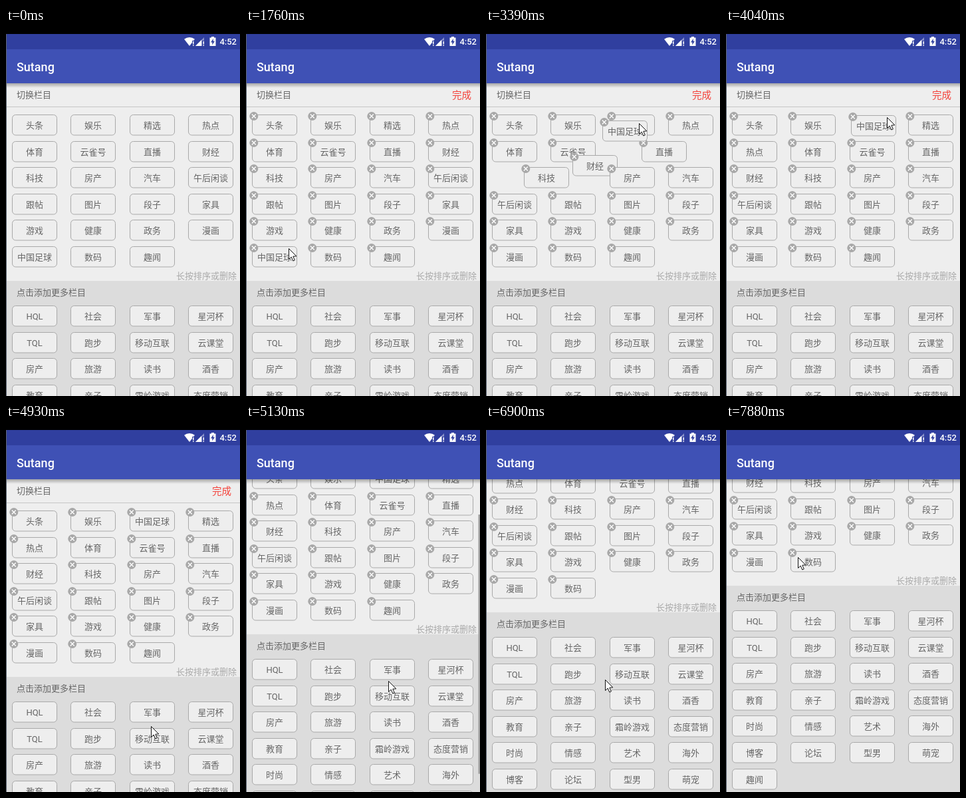
An HTML page with a canvas for the animation above (8 s loop, 352x553 px).

```html
<!DOCTYPE html>
<html lang="zh-CN">
<head>
<meta charset="utf-8">
<style>
  html, body { margin: 0; width: 100%; height: 100%; overflow: hidden; background: #eee; }
  canvas { display: block; }
</style>
</head>
<body>
<canvas id="stage" width="352" height="553"></canvas>
<script>
const ctx = document.getElementById('stage').getContext('2d');
const LOOP = 8000, TOP = 83, VIEW = 470;
const FONT = 'Roboto, "Noto Sans CJK SC", "Noto Sans CJK", sans-serif';

const mine = ('头条 娱乐 精选 热点 体育 云雀号 直播 财经 科技 房产 汽车 午后闲谈 跟帖 图片 段子 家具 ' +
  '游戏 健康 政务 漫画 中国足球 数码 趣闻').split(' ');
const more = ('HQL 社会 军事 星河杯 TQL 跑步 移动互联 云课堂 房产 旅游 读书 酒香 教育 亲子 霜岭游戏 态度营销 ' +
  '时尚 情感 艺术 海外 博客 论坛 型男 萌宠').split(' ');
const HELD = '中国足球', REMOVED = '趣闻';

// The screen refreshes in even beats inside each section: [start, beats]
const sections = [[0, 1], [330, 8], [1200, 1], [1760, 1], [2080, 8], [2970, 8], [3840, 8],
  [4690, 8], [5580, 8], [6460, 8], [7360, 6], [LOOP, 1]];

// Tracks: [time, values...]
const cursorPath = [[330, 189, 520], [600, 130, 440], [980, 52, 348], [1100, 52, 348], [1200, 64, 331],
  [2080, 64, 331], [2300, 72, 357], [2525, 116, 311], [2747, 158, 245], [2970, 166, 214],
  [3190, 179, 183], [3296, 213, 162], [3405, 230, 143], [3622, 242, 134], [4300, 242, 134],
  [4594, 222, 420], [4912, 218, 454], [5357, 211, 318], [5580, 211, 318], [6050, 167, 262],
  [6350, 187, 233], [6460, 187, 233], [6910, 179, 384], [7247, 172, 300], [7360, 172, 300], [7893, 108, 200]];
const dragPath = [[2080, 9, 328], [2300, 18, 354], [2525, 62, 308], [2747, 104, 244], [2970, 112, 212],
  [3190, 125, 180], [3296, 158, 158], [3405, 175, 139], [3622, 188, 131]];
const scrollPath = [[4912, 0], [5250, 97], [6910, 97], [7022, 101], [7247, 136.6]];
const barPath = [[4912, 0], [5023, 1], [5580, 1], [5900, 0], [6910, 0], [7022, 1], [7460, 1], [7800, 0]];
const swaps = [[2545, 17], [2870, 13], [3079, 9], [3273, 6], [3560, 2]];
const EDIT = 1760, GRAB = 2080, DROP = 4160, REMOVE = 6440;

const clamp = v => Math.max(0, Math.min(1, v));
const ease = v => 0.5 - Math.cos(Math.PI * clamp(v)) / 2;
const mix = (a, b, k) => a.map((v, i) => v + (b[i] - v) * k);
const slot = (i, top) => [9 + 88.33 * (i % 4), top + 39.6 * Math.floor(i / 4)];

function track(keys, t) {
  const n = keys.findIndex(k => k[0] > t);
  if (n === 0) return keys[0].slice(1);
  if (n < 0) return keys[keys.length - 1].slice(1);
  const a = keys[n - 1], b = keys[n];
  return mix(a, b, (t - a[0]) / (b[0] - a[0])).slice(1);
}

function snap(t) {
  const n = sections.findIndex(s => s[0] > t) - 1;
  const [start, beats] = sections[n];
  const beat = (sections[n + 1][0] - start) / beats;
  return start + beat * Math.min(beats - 1, Math.floor((t - start + 20) / beat));
}

function rect(x, y, w, h, color) {
  ctx.fillStyle = color;
  ctx.fillRect(x, y, w, h);
}

function poly(points, color) {
  ctx.beginPath();
  points.forEach(p => ctx.lineTo(...p));
  ctx.closePath();
  ctx.fillStyle = color;
  ctx.fill();
}

function text(s, x, y, color, size = 13, align = 'left', weight = 400) {
  ctx.font = `${weight} ${size}px ${FONT}`;
  ctx.textAlign = align;
  ctx.fillStyle = color;
  ctx.fillText(s, x, y);
}

function chip(label, [px, py], closable) {
  const x = Math.round(px), y = Math.round(py);
  ctx.beginPath();
  ctx.roundRect(x + 0.5, y + 0.5, 67, 30.5, 5);
  ctx.fillStyle = '#eee';
  ctx.fill();
  ctx.strokeStyle = '#a9a9a9';
  ctx.lineWidth = 1;
  ctx.stroke();
  text(label, x + 34, y + 21, '#666', 13, 'center');
  if (!closable) return;
  const cx = x + 2.8, cy = y + 2.5;
  ctx.beginPath();
  ctx.arc(cx, cy, 6.5, 0, 7);
  ctx.fillStyle = '#a8a8a8';
  ctx.fill();
  ctx.beginPath();
  for (const d of [-3, 3]) {
    ctx.moveTo(cx - 3, cy - d);
    ctx.lineTo(cx + 3, cy + d);
  }
  ctx.strokeStyle = '#fff';
  ctx.lineWidth = 1.3;
  ctx.stroke();
}

// Where every chip of the upper grid stands at time t
function places(t) {
  let order = mine.slice();
  const pos = {};
  order.forEach((name, i) => pos[name] = slot(i, 130));
  for (const [start, to] of swaps) {
    if (t < start) break;
    order = order.filter(name => name !== HELD);
    order.splice(to, 0, HELD);
    order.forEach((name, i) => pos[name] = mix(pos[name], slot(i, 130), ease((t - start) / 250)));
  }
  if (t >= GRAB) pos[HELD] = mix(track(dragPath, t), slot(t < DROP ? 20 : 2, 130), ease((t - DROP) / 250));
  pos[REMOVED] = mix(pos[REMOVED], slot(more.length, 417), ease((t - REMOVE) / 350));
  return pos;
}

function content(t, scroll) {
  const editing = t >= EDIT;
  ctx.save();
  ctx.beginPath();
  ctx.rect(0, TOP, 352, VIEW);
  ctx.clip();
  ctx.translate(0, -Math.round(scroll));
  text('切换栏目', 16, 105, '#666');
  if (editing) text('完成', 339, 106, '#f4433c', 14.5, 'right');
  rect(0, 118, 352, 1, '#c6c6c6');
  text('长按排序或删除', 347, 377, '#a9a9a9', 13, 'right');
  rect(0, 380, 352, 400, '#dcdcdc');
  text('点击添加更多栏目', 16, 402, '#666');
  more.forEach((name, i) => chip(name, slot(i, 417)));
  const pos = places(t);
  for (const name of mine) if (name !== HELD && name !== REMOVED) chip(name, pos[name], editing);
  chip(REMOVED, pos[REMOVED], editing && t < REMOVE);
  chip(HELD, pos[HELD], editing);
  ctx.restore();
}

function scrollbar(t, scroll) {
  const total = scroll > 97 ? 606.6 : 567;
  ctx.globalAlpha = track(barPath, t)[0];
  rect(349.5, TOP + scroll * VIEW / total, 2.5, VIEW * VIEW / total, '#a0a0a0');
  ctx.globalAlpha = 1;
}

function bars() {
  rect(0, 0, 352, 9, '#000');
  rect(0, 9, 352, 23, '#303f9f');
  rect(0, 32, 352, 51, '#3f51b5');
  const shade = ctx.createLinearGradient(0, TOP, 0, TOP + 7);
  shade.addColorStop(0, 'rgba(0,0,0,.3)');
  shade.addColorStop(1, 'rgba(0,0,0,0)');
  rect(0, TOP, 352, 7, shade);
  text('Sutang', 16, 65, '#fff', 18, 'left', 500);

  // wifi
  ctx.beginPath();
  ctx.moveTo(276, 27);
  ctx.arc(276, 27, 13, -Math.PI * 0.71, -Math.PI * 0.29);
  ctx.fillStyle = '#fff';
  ctx.fill();
  rect(280, 19, 4, 9, '#303f9f');
  rect(281, 20, 1.5, 4.5, '#fff');
  rect(281, 25.5, 1.5, 1.5, '#fff');
  // signal
  poly([[285, 27], [298, 27], [298, 14]], '#8790c8');
  poly([[285, 27], [294, 27], [294, 18]], '#fff');
  rect(295, 19, 3, 8, '#303f9f');
  rect(296.5, 20, 1.5, 4.5, '#fff');
  rect(296.5, 25.5, 1.5, 1.5, '#fff');
  // battery
  rect(309, 13, 4, 2, '#fff');
  rect(306.5, 14.5, 9, 12.5, '#fff');
  poly([[311.8, 16], [308, 21.6], [310.4, 21.6], [310.2, 25.5], [314, 19.8], [311.6, 19.8]], '#303f9f');
  text('4:52', 347, 25, '#fff', 13, 'right', 500);
}

function cursor(t) {
  if (t < 330) return;
  const [x, y] = track(cursorPath, t).map(Math.round);
  const shape = [[0, 0], [0, 16], [3.7, 12.6], [6.3, 18.5], [8.8, 17.4], [6.3, 11.7], [11.3, 11.4]];
  poly(shape.map(([dx, dy]) => [x + 0.5 + dx, y + 0.5 + dy]), '#fff');
  ctx.strokeStyle = '#111';
  ctx.lineWidth = 1;
  ctx.stroke();
}

function draw(now) {
  const t = snap(now % LOOP);
  const [scroll] = track(scrollPath, t);
  rect(0, 0, 352, 553, '#eee');
  content(t, scroll);
  scrollbar(t, scroll);
  bars();
  rect(0, 9, 1, 544, '#5a6270');
  cursor(t);
  requestAnimationFrame(draw);
}
requestAnimationFrame(draw);
</script>
</body>
</html>
```
